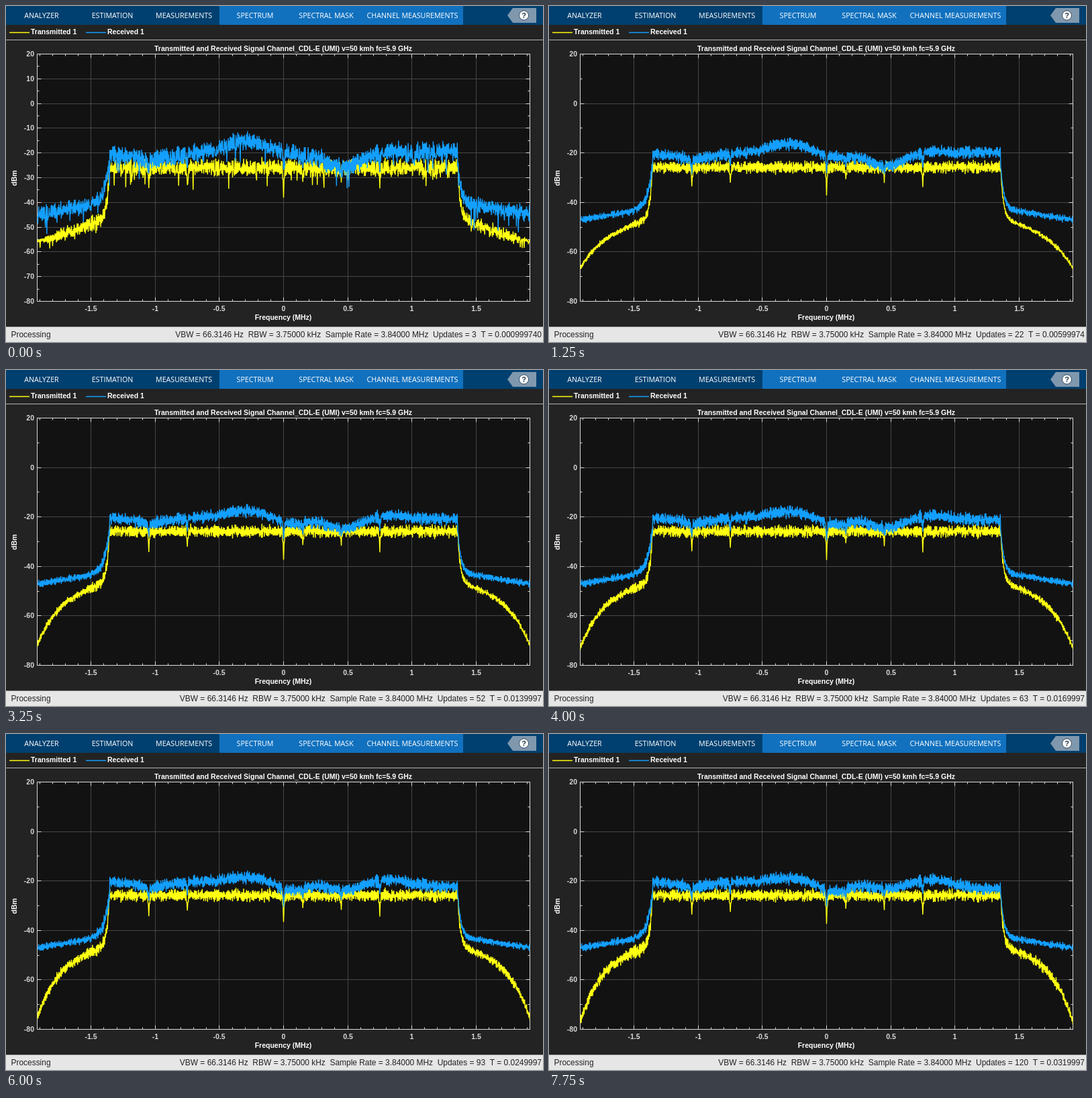
These frames come from a looping animation (800 by 500 pixels, 8000 ms). An HTML page with a canvas:

```html
<!DOCTYPE html>
<html lang="en">
<head>
<meta charset="utf-8">
<title>Spectrum analyzer</title>
<style>
html, body { margin: 0; width: 800px; height: 500px; overflow: hidden; background: #232323; }
canvas { display: block; }
</style>
</head>
<body>
<canvas id="stage" width="800" height="500"></canvas>
<script>
const ctx = document.getElementById('stage').getContext('2d');
const STEP_MS = 250, STEPS = 32, BINS = 1024, SPAN = 3.84, EDGE = 1.357;
const BOLD = 'bold 10.5px "Liberation Sans", Arial, sans-serif';
const PLAIN = '11.94px "Liberation Sans", Arial, sans-serif';
const TAB = '500 10.7px "Open Sans", sans-serif';
const YELLOW = '#ffff11', BLUE = '#139fff', INK = '#d9d9d9';
const LEFT = 46.5, RIGHT = 780.5, TOP = 71.5, BOTTOM = 439.5;

const toX = f => 413.5 + f * (RIGHT - LEFT) / SPAN;
const toY = db => 145.1 - db * 3.68;
const snap = v => Math.floor(v) + 0.5;

function random(i, seed) {
  const v = Math.sin(i * 12.9898 + seed * 78.233) * 43758.5453;
  return v - Math.floor(v);
}

// Bins alternate around the mean; part of the size is fixed, part is new each step
function ripple(i, seed, step) {
  const size = 0.1 + 0.55 * random(i, seed) + 0.35 * random(i, seed + step + 20);
  const drift = random(i, seed + 7) - 0.5;
  return (i % 2 ? size : -size) + 0.4 * drift;
}

// The first sweep is not averaged yet and has deep random notches
function spike(i, seed, step) {
  const rare = Math.max(0, random(i, seed + 3) - 0.85) / 0.15;
  return step ? 0 : -8 * rare ** 2;
}

const bump = (f, center, width) => Math.exp(-(((f - center) / width) ** 2));
const fall = (d, tau) => 1 - Math.exp(-d / tau);

const notches = [[-1.05, 7], [-0.75, 5], [0, 9], [0.15, 4], [0.45, 4.5], [0.75, 7]];
const notchAt = f => notches.reduce((sum, [center, depth]) => sum + depth * bump(f, center, 0.006), 0);

function transmitted(f, i, step) {
  const d = Math.abs(f) - EDGE, p = step / (STEPS - 1), seed = 1;
  const noise = ripple(i, seed, step), drop = spike(i, seed, step);
  if (d < 0) return -25.8 + noise * (step ? 2.8 : 3.8) + drop - notchAt(f);
  const depth = 6.2 * Math.log(1 + step) - 1.7;
  const nearLeft = f < 0 ? Math.exp(-d / 0.1) : 0;
  const amp = step ? 1 + 1.5 * p : 3 * Math.min(1, (0.6 - d) / 0.2);
  return -26 - 20 * fall(d, 0.02) - 20 * d - depth * (d / 0.565) ** 4
    + noise * (amp + 2 * nearLeft) + drop * 0.4;
}

function received(f, i, step) {
  const d = Math.abs(f) - EDGE, p = step / (STEPS - 1), seed = 5;
  const noise = ripple(i, seed, step), drop = spike(i, seed, step);
  if (d < 0) {
    return -20.6 - 2 * bump(f, -1.03, 0.13)
      + (1 + 4.5 * Math.exp(-step / 16)) * bump(f, -0.3, 0.25)
      - 4 * Math.sqrt(p) * bump(f, 0.06, 0.15)
      - (5 - 2.5 * p) * bump(f, 0.47, 0.18)
      + 1.2 * bump(f, 0.83, 0.18)
      + (1.6 - 4.2 * p) * bump(f, 1.25, 0.25)
      + noise * (step ? 2.8 : 4) + drop * 0.8 - 0.7 * notchAt(f);
  }
  const nearLeft = f < 0 ? Math.exp(-d / 0.1) : 0;
  return -25 - 17.5 * fall(d, f < 0 ? 0.04 : 0.025) - 8 * d + 2.5 * Math.exp(-step)
    + noise * (step ? 1.6 + 2 * nearLeft : 3.4) + drop;
}

function trace(level, step, color) {
  const points = [];
  for (let i = 0; i <= BINS; i++) {
    const f = SPAN * (i / BINS - 0.5);
    points.push([toX(f), toY(level(f, i, step))]);
  }
  line(points, color, 1.4);
}

function box(x, y, w, h, color) {
  ctx.fillStyle = color;
  ctx.fillRect(x, y, w, h);
}
function text(str, x, y, font, color, align = 'left') {
  ctx.font = font;
  ctx.fillStyle = color;
  ctx.textAlign = align;
  ctx.fillText(str, x, y);
}
function line(points, color, width = 1) {
  ctx.beginPath();
  points.forEach(([x, y]) => ctx.lineTo(x, y));
  ctx.strokeStyle = color;
  ctx.lineWidth = width;
  ctx.stroke();
}

function drawToolbar() {
  box(0, 0, 800, 28, '#004070');
  box(318, 0, 363, 28, '#1171be');
  [['ANALYZER', 53], ['ESTIMATION', 158.5], ['MEASUREMENTS', 265], ['SPECTRUM', 371],
    ['SPECTRAL MASK', 477], ['CHANNEL MEASUREMENTS', 605.5]]
    .forEach(([name, x]) => text(name, x, 18, TAB, '#fff', 'center'));
  ctx.fillStyle = '#7f98ae';
  ctx.beginPath();
  [[747, 14], [755, 3], [790, 3], [790, 25], [755, 25]].forEach(p => ctx.lineTo(...p));
  ctx.fill();
  ctx.beginPath();
  ctx.arc(771.5, 14, 7, 0, 7);
  ctx.fillStyle = '#fff';
  ctx.fill();
  ctx.strokeStyle = '#34495c';
  ctx.lineWidth = 1;
  ctx.stroke();
  text('?', 771.5, 18, 'bold 11px "Liberation Sans", sans-serif', '#22384c', 'center');
}

function drawLegend() {
  line([[5, 39.5], [35, 39.5]], YELLOW, 1.5);
  text('Transmitted 1', 37, 42, BOLD, '#fff');
  line([[119, 39.5], [149, 39.5]], BLUE, 1.5);
  text('Received 1', 151, 42, BOLD, '#fff');
  line([[0, 50.5], [800, 50.5]], '#b4b4b4');
}

function drawAxes(step) {
  const major = step ? 20 : 10, grid = '#474747';
  box(LEFT, TOP, RIGHT - LEFT, BOTTOM - TOP, '#121212');
  const tickX = (x, n) => [[TOP, n], [BOTTOM, -n]].forEach(([y, s]) => line([[x, y], [x, y + s]], INK));
  const tickY = (y, n) => [[LEFT, n], [RIGHT, -n]].forEach(([x, s]) => line([[x, y], [x + s, y]], INK));
  for (let n = -19; n <= 19; n++) {
    const x = snap(toX(n / 10));
    if (n % 5) { tickX(x, 3); continue; }
    line([[x, TOP], [x, BOTTOM]], grid);
    tickX(x, 6);
    text(String(n / 10), x, 453.5, BOLD, INK, 'center');
  }
  for (let db = -80; db <= 20; db += major / 2) {
    const y = snap(toY(db));
    if (db % major) { tickY(y, 3); continue; }
    line([[LEFT, y], [RIGHT, y]], grid);
    tickY(y, 6);
    text(String(db), 42, y + 3.5, BOLD, INK, 'right');
  }
  ctx.strokeStyle = INK;
  ctx.strokeRect(LEFT, TOP, RIGHT - LEFT, BOTTOM - TOP);
  text('Transmitted and Received Signal Channel_CDL-E (UMI) v=50 kmh fc=5.9 GHz', 413, 66.5, BOLD, '#fff', 'center');
  text('Frequency (MHz)', 413, 467, BOLD, '#fff', 'center');
  ctx.save();
  ctx.translate(16, 256);
  ctx.rotate(-Math.PI / 2);
  text('dBm', 0, 0, BOLD, '#fff', 'center');
  ctx.restore();
}

function drawTraces(step) {
  ctx.save();
  ctx.beginPath();
  ctx.rect(LEFT, TOP, RIGHT - LEFT, BOTTOM - TOP);
  ctx.clip();
  ctx.lineJoin = 'bevel';
  trace(transmitted, step, YELLOW);
  trace(received, step, BLUE);
  ctx.restore();
}

function drawStatus(step) {
  const updates = Math.floor(3.75 * (step + 1));
  const time = ((step + 1) / 1000 - 2.6e-7).toPrecision(6);
  box(0, 477, 800, 23, '#e6e6e6');
  line([[0, 477.5], [800, 477.5]], '#9a9a9a');
  text('Processing', 7.5, 493, PLAIN, '#222');
  text(`VBW = 66.3146 Hz  RBW = 3.75000 kHz  Sample Rate = 3.84000 MHz  Updates = ${updates}  T = ${time}`,
    798, 493, PLAIN, '#222', 'right');
}

function draw(step) {
  box(0, 0, 800, 500, '#232323');
  drawToolbar();
  drawLegend();
  drawAxes(step);
  drawTraces(step);
  drawStatus(step);
}

let shown = -1;
function tick() {
  const step = Math.floor(performance.now() / STEP_MS) % STEPS;
  if (step !== shown) draw(shown = step);
  requestAnimationFrame(tick);
}
tick();
</script>
</body>
</html>
```
